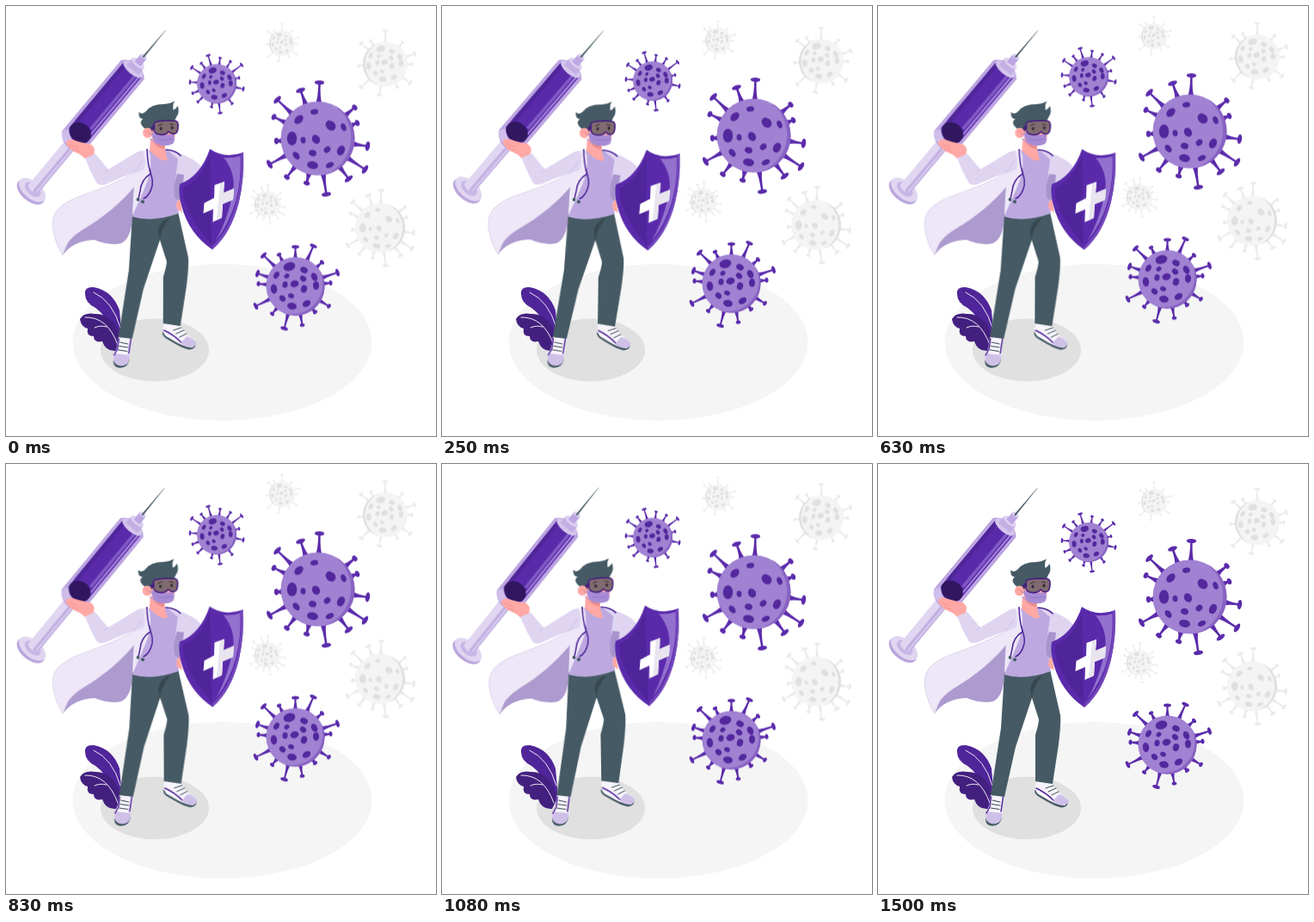
These frames come from a looping animation (500x500 px, 1540 ms). An HTML page:

```html
<!DOCTYPE html>
<html lang="en">
<head>
<meta charset="utf-8">
<title>Fighting the virus</title>
<style>
  html, body { margin: 0; width: 100%; height: 100%; overflow: hidden; background: #fff; }
  svg { display: block; width: 100%; height: 100%; }
  #hero, #viruses { animation: sway 1.54s linear -40ms infinite; }
  #hero { transform-origin: 145px 225px; }
  #viruses { animation-name: float; }
  @keyframes sway {
    25% { transform: rotate(1deg); }
    75% { transform: rotate(-1deg); }
  }
  @keyframes float {
    50% { transform: translateY(-10px); }
  }
  .main { fill: #5a2aab; }
  .deep { fill: #4f2599; }
  .skin { fill: #ffa8a5; }
  .coat { fill: #ede7f7; }
  .sleeve { fill: #dfd5f1; }
  .shirt { fill: #bda9e0; }
  .slate { fill: #455a64; }
  .line { fill: none; stroke: #4f2599; stroke-width: 1.5; stroke-linecap: round; stroke-linejoin: round; }
  .rib { fill: none; stroke: #fff; stroke-width: .9; stroke-linecap: round; }
</style>
</head>
<body>
<svg viewBox="0 0 500 500">
  <ellipse cx="251.5" cy="391" rx="174" ry="91" fill="#f5f5f5"/>
  <ellipse cx="173" cy="400" rx="63" ry="36.5" fill="#e0e0e0"/>

  <g id="leaves">
    <path class="deep" d="M92 335Q91 326 102 327Q124 331 132 354L135 388L122 378Q116 359 104 351Q92 345 92 335Z"/>
    <path class="rib" d="M102 333Q124 343 133 374"/>
    <path fill="#43207f" d="M128 401Q116 402 112 390Q102 392 102 384Q93 384 95 375Q87 373 86 364Q91 356 103 358Q126 357 134 389Z"/>
    <path class="rib" d="M92 362Q118 361 130 394M103 374Q109 371 117 373"/>
  </g>

  <g id="hero">
    <g id="cape">
      <path fill="#ad9ace" d="M66 290Q78 273 103 272Q120 279 134 276Q146 270 147 245L162 200L140 206L78 260Z"/>
      <path class="coat" stroke="#c5b7df" stroke-width=".5" d="M166 186L150 194Q122 209 92 219Q70 226 60 237Q52 246 55 262Q58 278 66 290Q69 273 88 261Q126 239 152 207L164 200Z"/>
    </g>

    <g id="shoes">
      <path class="slate" d="M126 408Q123 419 131 420.500Q142 422 144 411L144 406Z"/>
      <path fill="#f7f4fb" d="M131 385L146 386Q144 398 144 409Q142 418 133 418Q124 416 125 407Q130 399 131 385Z"/>
      <path fill="#cfc0e8" d="M126 404Q136 405 144 406Q145 418 134 418.500Q123 417 126 404Z"/>
      <path class="line" d="M131.500 387L130 399L126 406M145.500 387L143 404"/>
      <path class="line" style="stroke:#37474f;stroke-width:1" d="M133 391L142 393M132 395.500L142 397M131 400L141 401.500"/>
      <path class="slate" d="M182 379Q182 385 189 388Q207 399 214 399.500Q222 398 221 391Z"/>
      <path fill="#f7f4fb" d="M184 369L203 372Q206 380 219 388Q223 394 217 397Q209 398 190 386Q180 382 184 369Z"/>
      <path fill="#cfc0e8" d="M211 384Q222 388 221 394Q216 400 204 393Q206 387 211 384Z"/>
      <path class="line" d="M184 377Q195 382 204 391"/>
      <path class="line" style="stroke:#37474f;stroke-width:1" d="M195 377L204 374M198 381L207 377M202 385L210 381"/>
    </g>

    <g id="trousers">
      <path class="slate" d="M147 242L200 239L212 292Q213 301 210 326L203 372L183 369L183 315Q187 302 187 297L179 272Q173 290 160 329L147 387L131 385L143 307Z"/>
      <path fill="#37474f" d="M191 246Q178 250 177 262L179 273Q179 260 191 246Z"/>
    </g>

    <g id="torso">
      <path class="sleeve" d="M185 167L201 171Q220 177 229 189L218 215L196 237Z"/>
      <path class="shirt" d="M164 168L187 167L200 178L196 208L201 241Q170 252 147 245L158 205Z"/>
      <path fill="#a894cd" d="M199 195Q194 208 196 222L203 230L207 196Z"/>
      <path class="coat" d="M158 168L166 168Q171 187 165 202Q158 220 147 244L148 222L150 194Z"/>
      <path class="skin" d="M168 154L185 160L185 169L188 179Q180 182 167 168Z"/>
      <path fill="#e98d8c" d="M172 159Q177 166 184 166V160Z"/>
    </g>

    <g id="stethoscope">
      <path class="line" d="M164 167Q165 183 168 194Q171 202 170 209Q167 221 160 224M168 195Q157 202 156 215L154 224M186 167Q198 168 203 174"/>
      <g class="slate">
        <circle cx="153.500" cy="225" r="1.900"/>
        <circle cx="159" cy="227.500" r="2.100"/>
      </g>
    </g>

    <g id="head">
      <path class="skin" d="M167 130L196 128Q199 148 194 160Q183 165 170 156Z"/>
      <path class="slate" d="M162 143Q153 136 159 131.500Q153 130 154.500 123Q157 127 162 123Q168 114 184 114Q190 114 196 110.500Q193 115 194.500 121Q197 120 199.500 116Q202 124 198 129L195 135L174 135Q171 140 170 148L164 149Z"/>
      <ellipse class="skin" cx="164.500" cy="147.500" rx="5.500" ry="6"/>
      <path fill="none" stroke="#e98d8c" d="M162 146Q166 145 167 150"/>
      <path fill="none" stroke="#a78cd5" d="M167 148L172 151M167 154L173 159"/>
      <path fill="#a78cd5" d="M170 147Q184 151 195 149Q197 157 194 160Q187 164 177 161Q169 158 170 147Z"/>
      <path fill="none" stroke="#8e70c4" stroke-width=".7" d="M176 155Q185 157 194 154"/>
      <path fill="#806b70" stroke="#46217f" stroke-width="1.700" d="M174 134.500Q186 132.500 197 133.500Q200 134 200 139Q200 148 196 148.500Q192 149 189 146Q186 150 179 149.500Q172 149 171.500 142Q171 136 174 134.500Z"/>
      <path fill="#46217f" d="M168 141L173 138V143L169 145Z"/>
      <g fill="#342b35">
        <ellipse cx="180" cy="142.500" rx="1.500" ry="2"/>
        <ellipse cx="193" cy="141.500" rx="1.500" ry="2"/>
      </g>
      <path fill="none" stroke="#46343e" stroke-width="1.100" d="M177 139L182 137M190 137L195 138"/>
    </g>

    <g id="syringe" transform="translate(30 215) rotate(-50.3)">
      <ellipse cx="-2" rx="10.500" ry="19" fill="#b9a4dc"/>
      <ellipse cx="1" rx="10" ry="18.500" fill="#e0d6f1"/>
      <ellipse cx="2" rx="6.500" ry="11" fill="#c7b5e5"/>
      <path fill="#e0d6f1" d="M2 -7.500H84V7.500H2Q-3 0 2 -7.500Z"/>
      <path fill="#c2b0e1" d="M2 1H84V7.500H2Q0 5 0 2Z"/>
      <path fill="#d6c9ed" d="M2 4H84V6H1Z"/>
      <path fill="#bea6e2" stroke="#a88ad5" stroke-width=".7" d="M76 -17H183Q191 -10 191 0T183 17H76Q66 10 66 0T76 -17Z"/>
      <ellipse cx="76" rx="9" ry="16.500" fill="#cfbdeb"/>
      <path class="main" d="M84 -13.500H182Q188 -7 188 0T182 13.500H84Q76 8 76 0T84 -13.500Z"/>
      <path class="deep" d="M95 -13.500H182L185 -9H94Z"/>
      <path fill="#8159c4" d="M99 5H181V8.500H99Z"/>
      <path fill="#a787d8" d="M93 10H182V12H93Z"/>
      <ellipse cx="88" rx="11" ry="13.500" fill="#301760"/>
      <ellipse cx="184" rx="6" ry="14" fill="#d4c5ed"/>
      <path fill="#c3afe4" d="M183 -9H193Q198 0 193 9H183Z"/>
      <ellipse cx="193" rx="4" ry="9" fill="#ddd1f0"/>
      <path fill="#bea6e2" d="M192 -4.500H203Q206 0 203 4.500H192Z"/>
      <ellipse cx="203" rx="2.200" ry="4.500" fill="#ddd1f0"/>
      <path fill="#455a64" d="M202 -1.100L243 -.2V.2L202 1.100Z"/>
    </g>

    <g id="arm">
      <path class="skin" d="M70 158Q73 154 79 156Q88 159 94 160Q101 160 103 167L102 174L92 178Q88 173 82 171Q73 167 73 164Q69 162 70 158Z"/>
      <path fill="none" stroke="#ef908e" stroke-width=".8" d="M74 161L84 165M77 166L85 169"/>
      <path class="sleeve" d="M92 177L104 172Q111 181 119 190L152 170Q163 165 168 173Q168 185 159 191Q136 198 119 206Q109 211 105 205Q98 193 92 177Z"/>
      <path fill="none" stroke="#c7b7e4" stroke-width=".7" d="M119 190L113 194M158 180Q154 189 148 194"/>
      <path class="coat" d="M159 168H166Q169 181 167 190L160 193Q164 180 159 168Z"/>
      <path class="line" d="M164 167Q164.500 183 168 194"/>
    </g>

    <g id="shield">
      <path class="skin" d="M202 224Q196 230 199 236L205 240Z"/>
      <path class="main" d="M237 166Q254 178 276 170Q277 201 271 227Q262 264 240 283Q213 265 204 232Q200 216 202 207Q226 198 237 166Z"/>
      <path class="deep" d="M237 173Q227 202 206 211Q205 239 239 277Z"/>
      <path fill="#9470cf" d="M253 176Q264 177 272.500 174Q274 201 267 227Q260 252 244 273Q258 247 263 220Q269 196 253 176Z"/>
      <path fill="#7347bb" d="M273 171L276 170Q277 201 271 227Q262 264 240 283V279Q260 260 268 227Q275 199 273 171Z"/>
      <path fill="#fff" d="M242.500 208L254 204L253 217L265 212L264 225L252 230L251 246L240.500 251L241 236L229.500 241L230.500 229L242 223Z"/>
      <path fill="#e9e5ef" d="M249 206L254 204L253 217L265 212L264 225L252 230L251 246L245 249Z"/>
    </g>
  </g>

  <g id="viruses"></g>
</svg>

<script>
  // Spike tips as x, y offsets from the centre, with the body radius they fit.
  const spikes = {
    wide: { r: 43, at: [2,-65, -20,-56, -47,-45, -51,-25, -48,3, -56,30, -36,45, -13,52,
                        10,65, 36,47, 55,36, 58,9, 46,-18, 43,-36] },
    dense: { r: 34, at: [0,-46, 21,-47, 31,-28, 49,-16, 41,-4, 39,23, 23,30, 8,45,
                         -13,49, -27,32, -46,23, -43,-3, -44,-15, -37,-36, -19,-37] },
    small: { r: 23, at: [-10,-33, 4,-30, 16,-26, 29,-22, 26,-7, 31,6, 18,23, 4,34,
                         -6,27, -22,21, -28,11, -31,-2, -29,-19, -18,-24] },
    pale: { r: 26, at: [0,-39, 20,-25, 34,-12, 31,0, 29,22, 14,27, -7,36, -28,27, -31,2, -28,-24, -17,-27] }
  };

  // Spots as x, y, size.
  const spots = {
    few: { r: 43, at: [-22,-22,6, -4,-31,4.5, 15,-15,6.5, 30,-13,4.5, -30,0,8, -17,2,3.7, -2,1,5.5,
                       11,13,4.2, 27,14,6, -6,17,4.5, -25,20,5, -6,31,6.5, 14,31,5] },
    many: { r: 34, at: [-7,-23,7, 10,-19,4.5, -22,-13,4.5, 22,-11,5, -12,-2,3.8, -1,-3,5, 10,3,4.5,
                        -25,3,5.5, 24,-1,5, 9,-9,4, -5,11,3.5, -4,23,5.5, 13,20,5, -15,14,4, -10,-12,3.2] }
  };

  const purple = { spike: '#5a2aab', body: '#a081d2', edge: '#8862c2', spot: '#53289d' };
  const grey = { spike: '#ebebeb', body: '#f4f4f4', edge: '#e0e0e0', spot: '#e0e0e0' };
  const deg = (x, y) => Math.atan2(y, x) * 180 / Math.PI;

  function spike(x, y, r) {
    const len = Math.hypot(x, y), w = r * .085, tip = w * .32;
    const cap = r * (len / r > 1.35 ? .13 : .085);
    return `<g transform="rotate(${deg(x, y)})">
      <path d="M${r - 2} ${-w}Q${r + w} ${-tip} ${len} ${-tip}V${tip}Q${r + w} ${tip} ${r - 2} ${w}Z"/>
      <ellipse cx="${len}" rx="${r * .06}" ry="${cap}"/></g>`;
  }

  // Spots flatten towards the rim, as on a ball.
  function spot(x, y, size, r) {
    const d = Math.hypot(x, y), flat = Math.sqrt(1 - (d / r) ** 2);
    return `<ellipse transform="rotate(${deg(x, y)})" cx="${d}" rx="${size * Math.min(flat, .8)}" ry="${size}"/>`;
  }

  function virus(x, y, r, tips, dots, c, turn = 0) {
    let arms = '', marks = '';
    for (let i = 0; i < tips.at.length; i += 2)
      arms += spike(tips.at[i], tips.at[i + 1], tips.r);
    for (let i = 0; i < dots.at.length; i += 3)
      marks += spot(dots.at[i], dots.at[i + 1], dots.at[i + 2], dots.r);
    return `<g transform="translate(${x} ${y})">
      <g fill="${c.spike}" transform="scale(${r / tips.r})">${arms}</g>
      <circle r="${r}" fill="${c.body}"/>
      <path fill="${c.edge}" transform="rotate(${turn}) scale(${r})"
        d="M.3 -.954A1 1 0 0 1 .3 .954A1.058 1.058 0 0 0 .3 -.954Z"/>
      <g fill="${c.spot}" transform="scale(${r / dots.r})">${marks}</g></g>`;
  }

  document.getElementById('viruses').innerHTML =
    virus(321, 44, 15, spikes.pale, spots.many, grey, 180) +
    virus(441, 68, 26, spikes.pale, spots.many, grey, 180) +
    virus(304, 231, 15, spikes.wide, spots.many, grey, 180) +
    virus(435, 258.5, 29, spikes.wide, spots.few, grey) +
    virus(245, 91, 23, spikes.small, spots.many, purple, 30) +
    virus(336.5, 326.5, 34, spikes.dense, spots.many, purple, 40) +
    virus(362.5, 154.5, 43, spikes.wide, spots.few, purple, 10);
</script>
</body>
</html>
```
